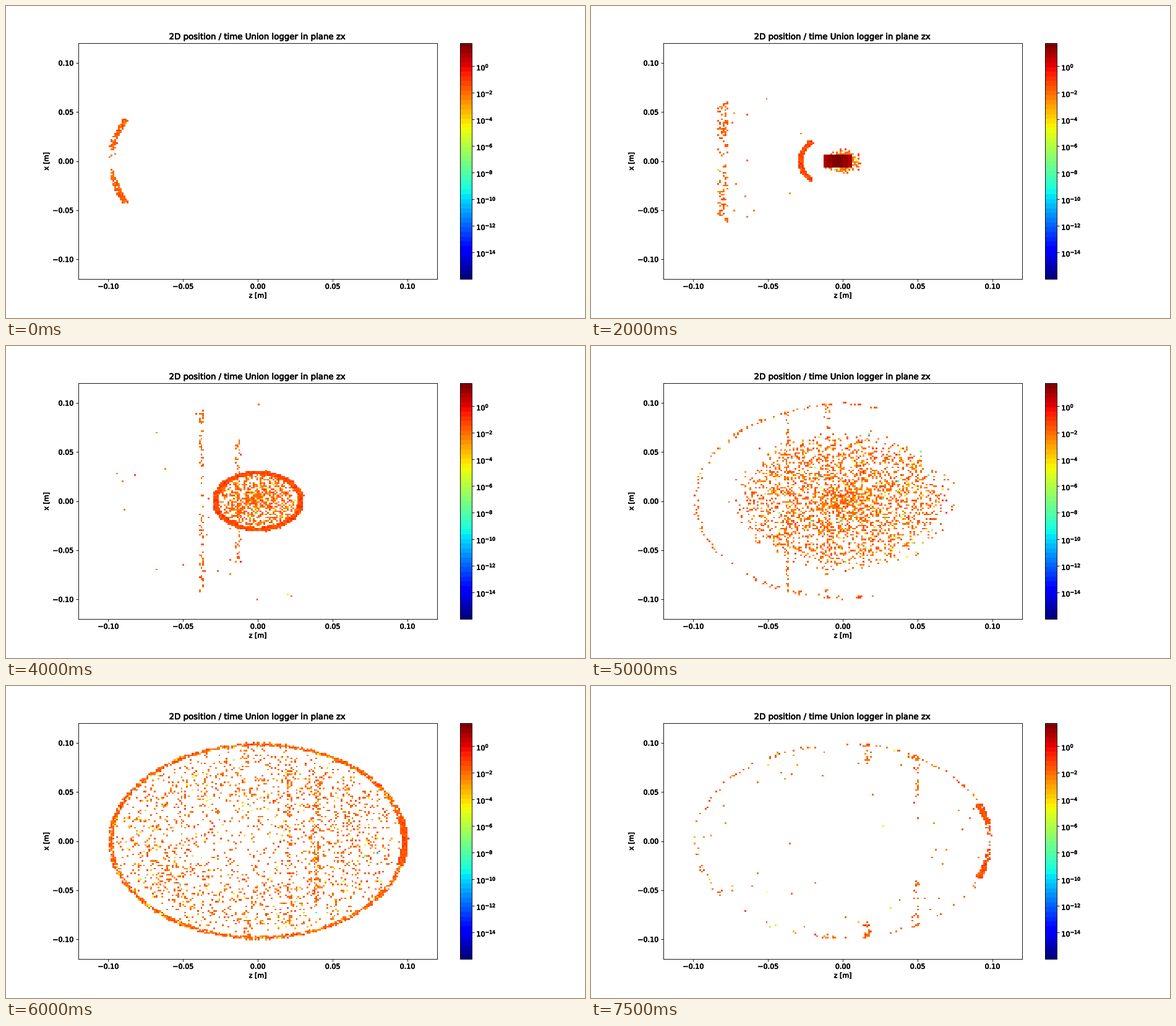
A matplotlib script that plays this animation: 936 px wide and 504 px high, repeating every 8000 ms.

```python
import numpy as np
import matplotlib.pyplot as plt
from matplotlib import patheffects
from matplotlib.animation import FuncAnimation

NZ, NX, LIM = 200, 150, 0.12
OUTER, INNER, SAMPLE = 0.0997, 0.03, 0.0145
WALL = 0.0027
FRAMES, STEP_MS = 16, 500

plt.rcParams.update({"font.family": "DejaVu Sans", "font.size": 10})


def centers(n):
    return ((np.arange(n) + 0.5) / n * 2 - 1) * LIM


Z, X = np.meshgrid(centers(NZ), centers(NX))
R = np.hypot(Z, X)


class Slice:
    """Log10 intensity of one time slice in the zx plane."""

    def __init__(self, seed):
        self.rng = np.random.default_rng(seed)
        self.grid = np.full((NX, NZ), np.nan)

    def dots(self, z, x, level=-1.9, tail=0.1):
        n = len(z)
        e = level + 0.35 * self.rng.normal(size=n)
        e -= (self.rng.random(n) < tail) * self.rng.exponential(1.2, n)
        i = np.floor((x / LIM + 1) / 2 * NX).astype(int)
        j = np.floor((z / LIM + 1) / 2 * NZ).astype(int)
        self.grid[i, j] = e

    def signs(self, n):
        return self.rng.choice([-1, 1], n)

    def strip(self, z0, z1, x0, x1, n, power=1.0):
        """Vertical strip mirrored in x; what passes the shell sticks to it."""
        z = self.rng.uniform(z0, z1, n)
        x = x0 + (x1 - x0) * self.rng.random(n) ** power
        x = np.minimum(x, np.sqrt(OUTER**2 - z**2) - WALL * self.rng.random(n))
        self.dots(z, x * self.signs(n), tail=0.04)

    def arc(self, side, radius, width, angle, n, power=1.0, level=-1.8, tail=0.0):
        """Shell section around the -z or +z pole; a low power fills the tips."""
        a = np.radians(angle) * self.rng.random(n) ** power * self.signs(n)
        r = radius - width * self.rng.random(n)
        self.dots(side * r * np.cos(a), r * np.sin(a), level, tail)

    def cloud(self, radius, power, n):
        a = self.rng.uniform(0, 2 * np.pi, n)
        r = radius * self.rng.random(n) ** power
        r = np.minimum(r * (1 + 0.07 * self.rng.normal(size=n)), OUTER - 0.001)
        self.dots(r * np.cos(a), r * np.sin(a), tail=0.25)

    def pulse(self, front, length=0.019, half=0.0058):
        """Direct beam, seen only where it crosses material."""
        matter = (R < SAMPLE)
        for radius in (INNER, OUTER):
            matter |= (R < radius) & (R > radius - WALL)
        u = (Z - front) / length * 2 + 1
        hit = matter & (abs(X) < half) & (abs(u) < 1)
        self.grid[hit] = 1.5 - 0.9 * u[hit] ** 2


def make_slice(k):
    s = Slice(40 + k)

    # Cloud scattered by the sample
    if k >= 4:
        keys = (4, 8, 10, 11, 13, 15)
        radius = np.interp(k, keys, (0.0115, 0.029, 0.067, 0.083, 0.098, 0.097))
        count = np.interp(k, keys, (300, 900, 2700, 2700, 1200, 60))
        s.cloud(radius, np.interp(k, (10, 13), (0.75, 0.22)), int(count))

    # Ring sweeping along the outer shell from the entry side
    if k == 0:
        s.arc(-1, OUTER, 0.0035, 25.5, 300, power=0.4)
    elif k <= 10:
        h = min(0.043 + 0.0045 * k + 0.00003 * k**3, 0.093)
        z = -np.sqrt(OUTER**2 - h**2)
        s.strip(z - max(0.009 - 0.0007 * k, 0.003), z, 0, h, 170 - 9 * k, 0.8)

    # Cones opening from the axis: z, drift, birth
    for z, drift, born in [(-0.015, 0.0015, 7), (0.0235, -0.0014, 10),
                           (0.036, 0.0032, 11)]:
        age = k - born
        lo, hi = max(0.04 * (age - 3), 0), min(0.025 * (age + 1.5), 0.11)
        if age > 0 and lo < hi:
            z += drift * age
            s.strip(z - 0.002, z + 0.002, lo, hi, 110 - 14 * age)

    # Outer shell
    if k >= 8:
        count = np.interp(k, (8, 10, 11, 13, 15), (8, 120, 1400, 2000, 120))
        s.arc(-1, OUTER, WALL, 180 if k > 10 else 105, int(count), tail=0.2)

    # Inner shell closes from both poles
    if 3 <= k <= 8:
        back, front = 17 * (k - 1.5), max(50 * (k - 6) + 10, 0)
        s.arc(-1, INNER, WALL, back, int(30 * back), level=-1.4)
        s.arc(1, INNER, WALL, front, int(30 * front), level=-1.4)

    # Stray hits
    if 4 <= k <= 8:
        z = s.rng.uniform(-0.098, -0.01, 13)
        s.dots(z, s.rng.uniform(-0.8, 0.8, 13) * np.sqrt(OUTER**2 - z**2))

    # Exit spot spreads, then splits into two tips
    if k >= 11:
        angle = 24 * (1 - np.exp(-0.6 * (k - 10.5)))
        count = np.interp(k, (11, 13, 15), (200, 1500, 260))
        s.arc(1, OUTER, 0.0035, angle, int(count), level=-1.6,
              power=np.interp(k, (13, 15), (1, 0.35)))

    s.pulse(0.006 + 0.015 * (k - 4))
    return s.grid


slices = [make_slice(k) for k in range(FRAMES)]

fig, ax = plt.subplots(figsize=(11.7, 6.3), dpi=80, facecolor="white")
fig.subplots_adjust(left=0.125, right=0.9, bottom=0.125, top=0.88)
image = ax.imshow(slices[0], origin="lower", extent=(-LIM, LIM, -LIM, LIM),
                  aspect="auto", interpolation="nearest",
                  cmap=plt.get_cmap("jet", 50), vmin=-16, vmax=1.72)
ax.set_title("2D position / time Union logger in plane zx")
ax.set_xlabel("z [m]")
ax.set_ylabel("x [m]")
ticks = np.arange(-0.10, 0.11, 0.05)
ax.set_xticks(ticks)
ax.set_yticks(ticks)

bar = fig.colorbar(image, ax=ax)
powers = range(-14, 1, 2)
bar.set_ticks(list(powers), labels=[r"$\mathdefault{10^{%d}}$" % p for p in powers])

# Slightly heavier lettering
heavy = [patheffects.withStroke(linewidth=0.6, foreground="black")]
for text in [ax.title, ax.xaxis.label, ax.yaxis.label, *ax.get_xticklabels(),
             *ax.get_yticklabels(), *bar.ax.get_yticklabels()]:
    text.set_path_effects(heavy)


def draw(k):
    image.set_data(slices[k])
    return [image]


anim = FuncAnimation(fig, draw, frames=FRAMES, interval=STEP_MS,
                     init_func=lambda: [image], repeat=True, repeat_delay=0)
plt.show()
```
